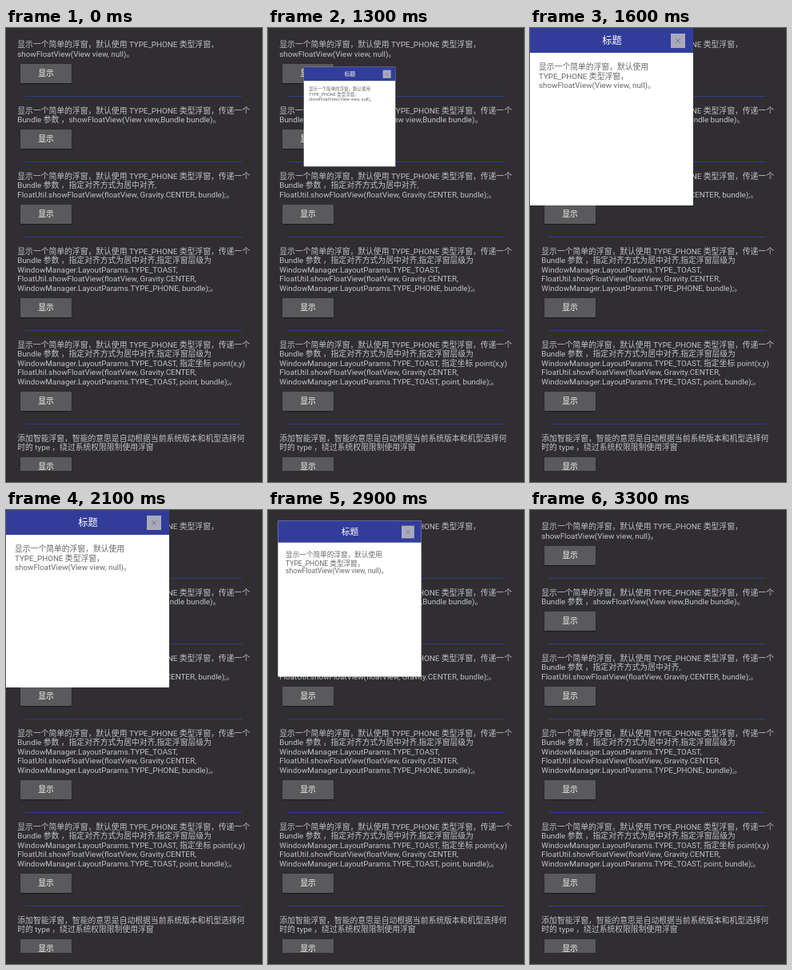
An HTML page for the animation above (3500 ms loop, 320 px wide and 568 px high).

```html
<!DOCTYPE html>
<html lang="zh-CN">
<head>
<meta charset="utf-8">
<title>浮窗</title>
<style>
  html, body { margin: 0; width: 100%; height: 100%; overflow: hidden; background: #302e31; }
  body {
    position: relative;
    font: 9.8px/11.6px Roboto, "Noto Sans CJK SC", sans-serif;
    color: #c3c2c4;
  }
  p { margin: 0; white-space: pre; }
  p span { display: block; height: 11.6px; }
  #list { position: absolute; inset: 0 0 auto; height: 554px; overflow: hidden; }
  .item { position: absolute; left: 14.3px; }
  .btn {
    position: absolute; left: 18px; width: 64px; height: 24px;
    border-radius: 1px; background: #5a595b; color: #fff;
    box-shadow: 0 1px 1.5px rgba(0, 0, 0, .45);
    line-height: 24px; text-align: center;
  }
  .rule { position: absolute; left: 24px; width: 271px; height: 1.3px; background: #343b8c; }
  #popup {
    position: absolute; left: 0; top: 0; width: 204px; height: 222px;
    background: #fff; color: #686868; visibility: hidden;
  }
  #popup header {
    height: 31px; background: #323d9b; color: #fff;
    font-size: 12.2px; line-height: 32px; text-align: center; text-indent: 1px;
  }
  #popup p { position: absolute; left: 11px; top: 43.2px; }
  #popup svg { position: absolute; left: 176px; top: 7px; width: 18px; height: 18px; background: #a9abbc; }
</style>
</head>
<body>
<div id="list"></div>
<div id="popup">
  <header>标题</header>
  <svg viewBox="0 0 18 18"><path d="M6 6l6 6M12 6l-6 6" stroke="#747684"/></svg>
  <p></p>
</div>
<script>
  const LOOP = 3500, TICK = 100, ZOOM = 269, OPEN = 1155, CLOSE = 2839;
  const LINE = 11.6, GAP = 59;

  const intro = "显示一个简单的浮窗，默认使用 TYPE_PHONE 类型浮窗，";
  const passing = intro + "传递一个";
  const params = "WindowManager.LayoutParams.";
  const call = "FloatUtil.showFloatView(floatView, Gravity.CENTER,";
  const level = "Bundle 参数 ，指定对齐方式为居中对齐,指定浮窗层级为";

  const items = [
    [intro, "showFloatView(View view, null)。"],
    [passing, "Bundle 参数 ，showFloatView(View view,Bundle bundle)。"],
    [passing, "Bundle 参数 ，指定对齐方式为居中对齐,", call.replace(/^/, "") + " bundle);。"],
    [passing, level, params + "TYPE_TOAST,", call, params + "TYPE_PHONE, bundle);。"],
    [passing, level, params + "TYPE_TOAST, 指定坐标 point(x,y)", call, params + "TYPE_TOAST, point, bundle);。"],
    ["添加智能浮窗，智能的意思是自动根据当前系统版本和机型选择何", "时的 type ，绕过系统权限限制使用浮窗"]
  ];

  const list = document.getElementById("list");
  const popup = document.getElementById("popup");

  function fill(p, lines) {
    for (const line of lines) {
      const span = document.createElement("span");
      span.textContent = line;
      p.append(span);
    }
  }

  function add(tag, name, y) {
    const el = document.createElement(tag);
    el.className = name;
    el.style.top = y + "px";
    list.append(el);
    return el;
  }

  let y = 15.3;
  for (const lines of items) {
    const end = y + lines.length * LINE;
    fill(add("p", "item", y), lines);
    add("div", "btn", Math.round(end + 6.3)).textContent = "显示";
    add("div", "rule", Math.round(end + 46.3));
    y = end + GAP;
  }
  fill(popup.querySelector("p"), ["显示一个简单的浮窗，默认使用", "TYPE_PHONE 类型浮窗，", items[0][1]]);

  function ease(t) {
    const u = Math.min(1, Math.max(0, t));
    return (1 - Math.cos(Math.PI * u)) / 2;
  }

  // The picture advances in whole ticks.
  function draw(now) {
    const t = Math.floor((now % LOOP) / TICK) * TICK;
    const scale = ease((t - OPEN) / ZOOM) - ease((t - CLOSE) / ZOOM);
    popup.style.visibility = scale > .01 ? "visible" : "hidden";
    popup.style.transform = scale < 1 ? `scale(${scale})` : "none";
    requestAnimationFrame(() => draw(performance.now() - start));
  }

  const start = performance.now();
  draw(0);
</script>
</body>
</html>
```
